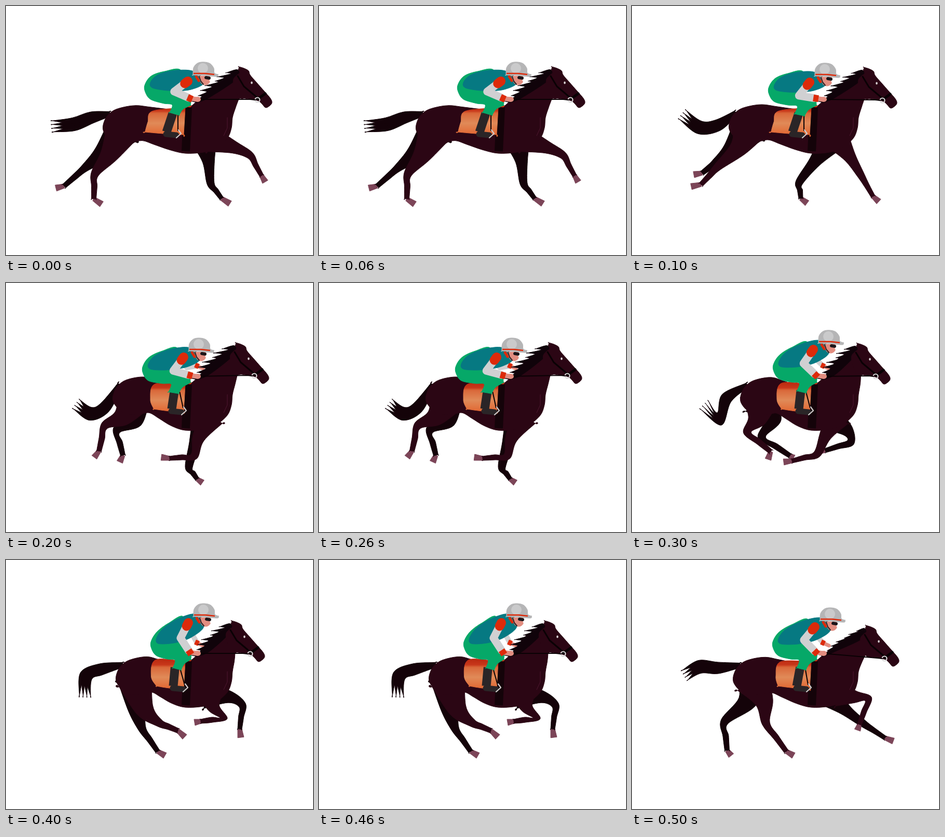
Animation of 591x480 px, one loop 0.6 s. Source, as an HTML page with a canvas:

```html
<!DOCTYPE html>
<html lang="en">
<head>
<meta charset="utf-8">
<title>Galloping racehorse</title>
<style>
html, body { margin: 0; height: 100%; overflow: hidden; background: #fff; }
canvas { display: block; }
</style>
</head>
<body>
<canvas id="stage" width="591" height="480"></canvas>
<script>
const ctx = document.getElementById('stage').getContext('2d');
const STEP = 100;
const COAT = '#2b0614', DARK = '#140309', TACK = '#090104', HOOF = '#7c4558', RED = '#dd2a0a',
  GREEN = '#06a868', TEAL = '#067982', SLEEVE = '#d0d0d2', SKIN = '#e28d80', BOOT = '#2a2527';

// Each pose moves the rump, horse head, rider's seat, rider's head and foot from the
// resting shapes below. Legs run thigh, hock or knee, fetlock, toe.
const poses = [
  { rump: [0, 2], head: [2, -1], seat: [4, -5], cap: [8, -2], foot: 0,
    tail: '165,215 130,228 90,232',
    hind: '198,288 171,324 169,372 184,382', farHind: '185,285 152,312 112,347 96,351',
    fore: '440,273 470,288 492,327 499,339', farFore: '390,300 394,342 415,371 431,381' },
  { rump: [0, 0], head: [0, 0], seat: [0, 0], cap: [0, 0], foot: 0,
    tail: '165,230 130,234 98,210',
    hind: '205,274 165,310 133,344 114,348', farHind: '190,280 160,303 135,322 119,325',
    fore: '420,292 440,325 464,367 475,377', farFore: '352,300 322,340 325,371 337,380' },
  { rump: [19, -10], head: [-4, -3], seat: [0, 4], cap: [0, -4], foot: 10,
    tail: '190,240 162,252 136,234',
    hind: '222,260 190,275 179,324 170,336', farHind: '245,266 213,284 225,332 219,345',
    fore: '370,300 362,334 315,338 299,336', farFore: '364,310 352,355 368,378 378,385' },
  { rump: [22, -9], head: [-13, -2], seat: [9, 0], cap: [7, -19], foot: 12,
    tail: '182,222 168,262 140,236',
    hind: '240,265 222,288 267,325 262,340', farHind: '270,265 250,297 304,333 311,337',
    fore: '372,295 356,330 308,343 292,345', farFore: '415,285 421,307 372,323 364,323' },
  { rump: [25, -4], head: [-12, -1], seat: [16, 0], cap: [9, -26], foot: 13,
    tail: '182,211 154,224 152,262',
    hind: '268,290 295,314 331,329 344,341', farHind: '253,290 262,325 292,369 306,377',
    fore: '400,285 419,305 375,311 363,313', farFore: '430,264 455,280 450,326 452,342' },
  { rump: [8, -3], head: [4, 8], seat: [8, 0], cap: [10, -18], foot: 8,
    tail: '165,208 130,206 102,222',
    hind: '255,275 258,315 297,369 311,377', farHind: '220,275 178,312 183,367 191,377',
    fore: '430,264 455,268 438,317 434,328', farFore: '410,288 445,315 487,343 503,349' }
];

// Smooth outlines; "!" marks a corner.
const TORSO = '188,240 190,218 203,202 222,194 250,190 280,194 320,199 350,196 367,184 385,167 408,149 430,135 446,124! 465,145 460,170 447,180! 442,195 436,215 434,235 426,255 405,273 380,282 345,284 315,277 285,266 262,258 240,262 210,262';
const HEAD = '446,118! 456,121 465,126 468,134 480,148 495,165 507,179 510,187 506,193 498,197 491,190 484,184 470,181 458,179 448,178 438,160 436,142 448,130!';
const BREECHES = '330,127 300,130 275,140 263,158 265,173 275,185 300,191 318,193 313,208! 332,212! 340,200 355,192! 352,180 330,170';
const VEST = '286,138 310,129 340,126 358,130 369,140 372,153 350,163 325,166 300,166 277,162 274,152';
const DOME = '352,135! 353,121 361,112 373,110 385,113 392,122 393,131 400,134! 398,138 375,136';

const clamp = v => Math.max(0, Math.min(1, v));
const mix = (a, b, t) => a.map((v, i) => v + (b[i] - v) * t);
const add = (a, b) => [a[0] + b[0], a[1] + b[1]];
const unit = ([x, y]) => [x / Math.hypot(x, y), y / Math.hypot(x, y)];

function points(text, warp = p => p) {
  return text.split(' ').flatMap(s => {
    const p = warp(s.replace('!', '').split(',').map(Number));
    return s.endsWith('!') ? [p, p] : [p];
  });
}

function paint(color) {
  ctx.fillStyle = ctx.strokeStyle = color;
  ctx.lineWidth = 1;
  ctx.lineJoin = 'round';
  ctx.fill();
  ctx.stroke();
}

function shape(p, color) {
  const n = p.length, at = i => p[(i + n) % n];
  ctx.beginPath();
  ctx.moveTo(...p[0]);
  for (let i = 0; i < n; i++) {
    const [a, b, c, d] = [at(i - 1), at(i), at(i + 1), at(i + 2)];
    ctx.bezierCurveTo(b[0] + (c[0] - a[0]) / 6, b[1] + (c[1] - a[1]) / 6,
      c[0] - (d[0] - b[0]) / 6, c[1] - (d[1] - b[1]) / 6, ...c);
  }
  ctx.closePath();
  paint(color);
}

function line(color, width, cap, ...pts) {
  ctx.beginPath();
  pts.forEach(p => ctx.lineTo(...p));
  Object.assign(ctx, { strokeStyle: color, lineWidth: width, lineCap: cap, lineJoin: 'round' });
  ctx.stroke();
}

function oval(color, x, y, rx, ry = rx) {
  ctx.beginPath();
  ctx.ellipse(x, y, rx, ry, 0, 0, 7);
  ctx.fillStyle = color;
  ctx.fill();
}

function shifted(offset, drawPart) {
  ctx.save();
  ctx.translate(...offset);
  drawPart();
  ctx.restore();
}

function normal(p, i) {
  const a = p[Math.max(i - 1, 0)], b = p[Math.min(i + 1, p.length - 1)];
  const [x, y] = unit([b[0] - a[0], b[1] - a[1]]);
  return [-y, x];
}

// Tapered shape around a spine, with one width per spine point.
function limb(spine, widths, color) {
  const side = sign => spine.map((p, i) => add(p, normal(spine, i).map(v => v * sign * widths[i] / 2)));
  const left = side(1), right = side(-1).reverse();
  const ends = pts => [pts[0], ...pts, pts[pts.length - 1]];
  shape([...ends(left), ...ends(right)], color);
}

function leg(root, text, widths, color) {
  const [thigh, joint, fetlock, toe] = points(text);
  const shin = mix(joint, fetlock, 0.5);
  const hoof = [fetlock, toe], n = normal(hoof, 0);
  const corner = (p, w) => add(p, n.map(v => v * w));
  ctx.beginPath();
  [corner(fetlock, 4), corner(fetlock, -4), corner(toe, -6), corner(toe, 6)].forEach(p => ctx.lineTo(...p));
  ctx.closePath();
  paint(HOOF);
  limb([root, thigh, joint, shin, fetlock], widths, color);
}

function tail(p) {
  const spine = [add([200, 206], p.rump), ...points(p.tail)];
  for (let k = -1.5; k <= 1.5; k++) {
    const lock = spine.map((pt, i) => add(pt, normal(spine, i).map(v => v * k * i * 2.4)));
    limb(lock, [9, 15, 11, 0], DARK);
  }
}

function mane([dx, dy]) {
  const top = [444 + dx, 124 + dy], end = [368, 186], n = 7, length = 17 - dy;
  const at = t => add(mix(top, end, t), [-5 * Math.sin(Math.PI * t), -3 * Math.sin(Math.PI * t)]);
  const edge = [];
  for (let i = 0; i < n; i++) {
    const tip = add(at((i + 0.6) / n), [-length * (0.75 + 0.25 * Math.sin(i * 2.3)), 1]);
    edge.push(at(i / n), tip, tip);
  }
  shape([...edge, end, end, add(end, [24, -10]), add(top, [-2, 18])], '#10030a');
}

function horseHead() {
  shape(points(HEAD), COAT);
  line(TACK, 3, 'round', [444, 136], [456, 156], [482, 178]);
  line(TACK, 5, 'round', [483, 180], [497, 170]);
  oval('#d8d0d2', 471, 149, 1.8, 2.4);
  ctx.beginPath();
  ctx.arc(482, 182, 4.5, 0, 7);
  ctx.strokeStyle = '#d8d8d8';
  ctx.lineWidth = 2.2;
  ctx.stroke();
}

function riderHead() {
  line(RED, 5, 'round', [358, 138], [363, 146]);
  shape(points('363,137! 384,137! 382,142 384,149 377,154 368,151'), SKIN);
  line(BOOT, 2, 'round', [364, 138], [367, 147], [372, 153]);
  line('#1c1519', 6, 'round', [377, 140], [383, 141]);
  shape(points(DOME), '#b5b5b6');
  oval('#cacacb', 371, 122, 10);
  line(RED, 2.5, 'butt', [353, 132], [375, 132], [393, 134]);
}

const HAND = [367, 180], WRIST = [354, 178];

function farArm(shoulder) {
  const cuff = [368, 160];
  line(SLEEVE, 10, 'round', add(shoulder, [6, 20]), cuff);
  line(SKIN, 7, 'round', cuff, [379, 165]);
  line(RED, 10, 'butt', [364, 158], [371, 161]);
}

function arm(shoulder) {
  const [dx, dy] = [WRIST[0] - shoulder[0], WRIST[1] - shoulder[1]];
  const d = Math.hypot(dx, dy), bend = Math.sqrt(33 * 33 - d * d / 4);
  const elbow = add(mix(shoulder, WRIST, 0.5), [-dy / d * bend, dx / d * bend]);
  line(SKIN, 9, 'round', WRIST, HAND);
  oval(SKIN, HAND[0] + 2, HAND[1], 6, 5);
  line(SLEEVE, 15, 'round', shoulder, elbow, mix(elbow, WRIST, 0.9));
  line(RED, 18, 'round', shoulder, mix(shoulder, elbow, 0.22));
  line(RED, 13, 'butt', mix(elbow, WRIST, 0.85), mix(elbow, WRIST, 1.15));
}

function rider(p, shoulder) {
  const warp = ([x, y]) => {
    const u = clamp((x - 270) / 90), v = u * clamp((190 - y) / 45);
    return [0, 1].map(i => [x, y][i] + p.seat[i] * (1 - u) + p.cap[i] * v);
  };
  const knee = [321 + p.foot / 3, 207], ankle = [309 + p.foot, 243], toe = [331 + p.foot, 249];
  line(BOOT, 17, 'butt', knee, ankle);
  line(BOOT, 11, 'round', add(ankle, [-1, 4]), add(toe, [-3, 0]));
  line(TACK, 2, 'butt', add(knee, [10, 3]), add(toe, [0, -8]));
  line('#cfcaca', 2.2, 'round', add(toe, [-3, 5]), add(toe, [6, -3]), add(toe, [1, -10]));
  shape(points(BREECHES, warp), GREEN);
  shape(points(VEST, warp), TEAL);
  shifted(p.cap, riderHead);
  arm(shoulder);
}

const orange = ctx.createLinearGradient(0, 190, 0, 250);
[[0, '#b8280f'], [0.2, '#c8371a'], [0.28, '#d9683a'], [0.6, '#e08a58'], [1, '#e2642f']]
  .forEach(s => orange.addColorStop(...s));

function saddle(foot) {
  const back = foot - 12;
  line(RED, 5, 'butt', [343, 204], [356, 191]);
  line(DARK, 16, 'butt', [350, 195], [346, 280]);
  const low = [288 + back * 1.7, 243];
  const front = [[345, 196], [345, 196], [342, 248], [342, 248]];
  shape([[288 + back / 2, 193 - back * 0.8], ...front, [315, 247], low, low, [279 + back / 2, 224]], orange);
}

function draw(p) {
  const warp = ([x, y]) => {
    const r = clamp((330 - x) / 90), h = clamp((205 - y) / 50) * clamp((x - 370) / 40);
    return [0, 1].map(i => [x, y][i] + p.rump[i] * r + p.head[i] * h);
  };
  const hip = add([224, 238], p.rump), shoulder = add([342, 147], p.cap);
  const hindWidths = [66, 34, 15, 11, 9], foreWidths = [48, 23, 14, 10, 8];
  ctx.fillStyle = '#fff';
  ctx.fillRect(0, 0, 591, 480);
  tail(p);
  leg(hip, p.farHind, hindWidths, DARK);
  leg([382, 262], p.farFore, foreWidths, DARK);
  leg(hip, p.hind, hindWidths, COAT);
  leg([396, 258], p.fore, foreWidths, COAT);
  if (p.foot) farArm(shoulder);
  shape(points(TORSO, warp), COAT);
  mane(p.head);
  shifted(p.head, horseHead);
  line('#4e1730', 1, 'round', [426, 215], [426, 235], [419, 250]);
  saddle(p.foot);
  line(TACK, 2, 'round', HAND, add([468, 181], p.head), add([478, 182], p.head));
  rider(p, shoulder);
}

function tick(now) {
  draw(poses[Math.floor(now / STEP) % poses.length]);
  requestAnimationFrame(tick);
}
requestAnimationFrame(tick);
</script>
</body>
</html>
```
